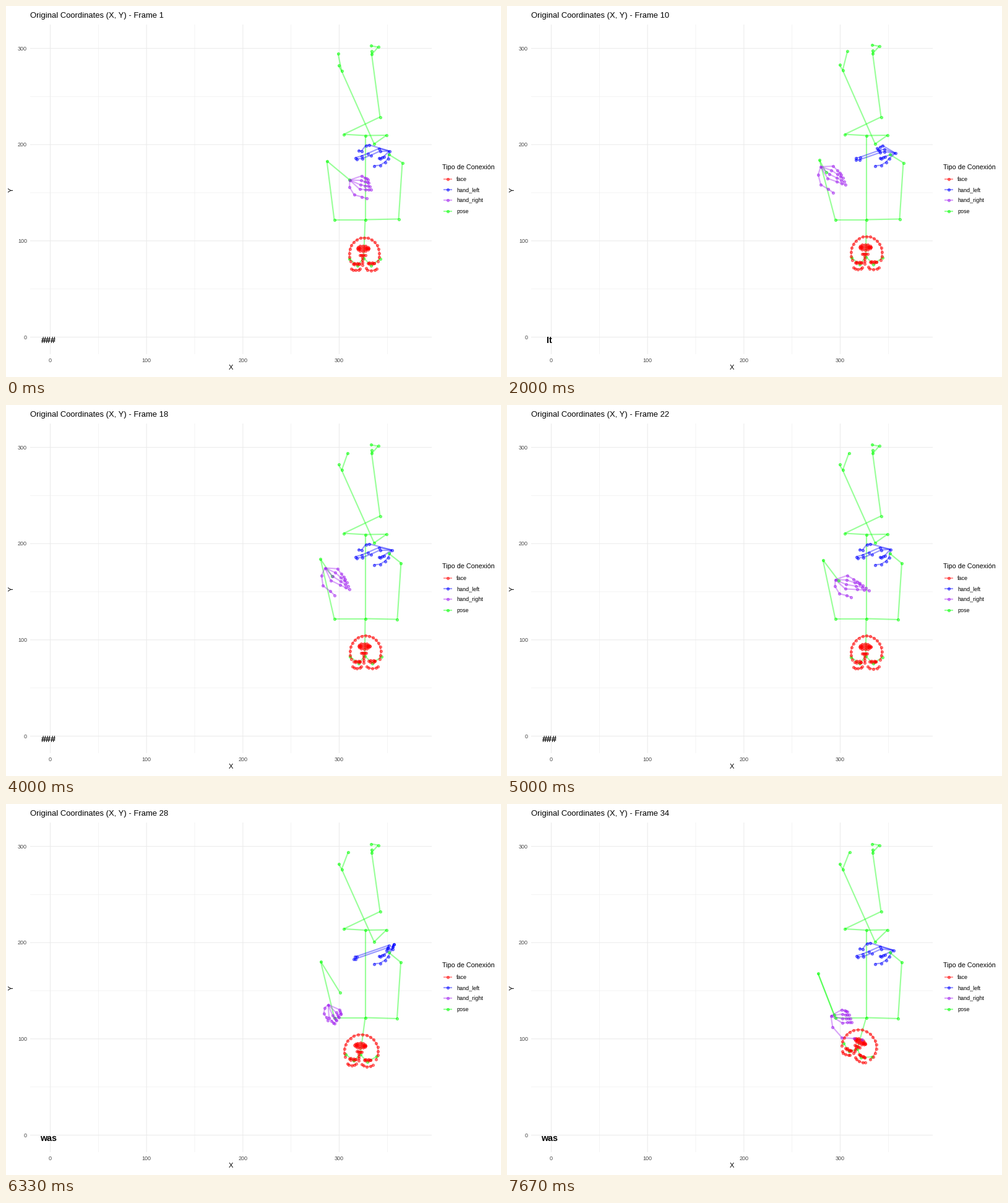
Recreate the animation shown at these times as a matplotlib script. Size 800 by 600 pixels, loop 8000 ms.

```python
import numpy as np
import matplotlib.pyplot as plt
from matplotlib.animation import FuncAnimation
from matplotlib.collections import LineCollection

LOOP, TICK, STEPS = 8000, 50, 24  # ms, ms, poses per loop
PX = 0.72                         # points per pixel at 100 dpi
COLORS = {"pose": "#00ff00", "face": "#ff0000",
          "hand_left": "#0000ff", "hand_right": "#a020f0"}

plt.rcParams["font.family"] = "Liberation Sans"


# Motion helpers
def along(path, i):
    """Linear interpolation through {step: values}."""
    steps = list(path)
    return np.array([np.interp(i, steps, column) for column in zip(*path.values())])


def ease(i, start, end):
    u = np.clip((i - start) / (end - start), 0, 1)
    return u * u * (3 - 2 * u)


def rotation(degrees):
    c, s = np.cos(np.radians(degrees)), np.sin(np.radians(degrees))
    return np.array([(c, s), (-s, c)])


def arc(cx, cy, rx, ry, start, end, n):
    a = np.radians(np.linspace(start, end, n))
    return np.c_[cx + rx * np.cos(a), cy + ry * np.sin(a)]


# Body
FEET = dict(heel_a=(537, 96), ankle_a=(542, 105), toe_b=(601, 66), toe_b2=(589, 64),
            heel_b=(590, 73), ankle_b=(590.5, 78))
HIPS = dict(hip_a=(614.5, 208.5), hip=(580, 209), hip_b=(545.5, 207), knee_b=(604, 179))
STILL = dict(knee_a=(594.5, 222.5), neck=(580, 345), shoulder_r=(530, 345), wrist_l=(618, 239.5))
LEFT_ARM = dict(shoulder_l=(634, 344), elbow_l=(640, 253))
PATHS = dict(
    toe_a={0: (536, 76), 4: (548, 68), 8: (551.5, 77), 23: (553, 77)},
    elbow_r={0: (518, 250), 4: (504, 250), 8: (505, 247), 15: (510, 250),
             19: (508, 254), 23: (502, 273)},
    wrist_r={0: (554, 280), 4: (518, 270), 8: (512, 267), 12: (526, 276),
             15: (535, 283), 19: (539, 304), 23: (528, 340)})
HEAD = dict(nose=(-1, 6), eye_r=(-11, 18), eye_l=(11, 18), ear_r=(-24.5, 7.5), ear_l=(26, 7.5))
BONES = [b.split() for b in (
    "toe_a ankle_a knee_a hip_a hip hip_b knee_b ankle_b toe_b toe_b2",
    "heel_a ankle_a", "heel_b ankle_b", "hip neck nose",
    "neck shoulder_r elbow_r wrist_r", "neck shoulder_l elbow_l wrist_l",
    "nose eye_r ear_r", "nose eye_l ear_l")]


def body_chains(i):
    shifts = [(FEET, (0, -4 * np.exp(-((i - 4) / 2) ** 2))),
              (HIPS, (0, -5.5 * ease(i, 15, 19))),
              (LEFT_ARM, np.array((-2.5, 2.5)) * ease(i, 6, 14)),
              (STILL, (0, 0))]
    joints = {name: np.add(p, move) for part, move in shifts for name, p in part.items()}
    joints |= {name: along(path, i) for name, path in PATHS.items()}
    joints |= dict(zip(HEAD, on_face(list(HEAD.values()), i)))
    return [np.array([joints[n] for n in bone]) for bone in BONES], list(joints.values())


# Face: centre x, centre y, jaw half width, vertical scale, tilt
FACE = {0: (578.5, 401, 24.5, 1, 0), 4: (580.7, 399.7, 25.2, 1, 0),
        8: (580.5, 398.5, 25, 1, 0), 15: (580.3, 399.8, 25, 1, 0),
        19: (573.5, 399, 27.5, 0.93, 4), 23: (568.5, 391.5, 28, 0.82, 26)}
FEATURES = [
    arc(-14, 22.5, 7.2, 3.5, 165, 10, 5), arc(11.5, 22.5, 9, 4, 175, 10, 5),  # brows
    np.linspace((-3, 17), (-3.3, 5), 4), np.linspace((-7, 1.3), (1.5, 1.3), 5),  # nose
    arc(-13.5, 15.2, 5, 1.3, 0, 360, 7), arc(10.5, 14.7, 5, 1.3, 0, 360, 7),  # eyes
    arc(-2.2, -9.5, 9, 4.5, 0, 360, 13), arc(-2.2, -9.5, 6.5, 1.5, 0, 360, 9)]  # lips


def on_face(points, i, squash=True):
    cx, cy, _, scale, tilt = along(FACE, i)
    return np.asarray(points) * (1, scale if squash else 1) @ rotation(tilt) + (cx, cy)


def face_chains(i):
    jaw = arc(0, 0, along(FACE, i)[2], -27, -25, 205, 17)
    chains = [on_face(jaw, i, squash=False)] + [on_face(f, i) for f in FEATURES]
    return chains, np.vstack(chains)


# Right hand: wrist x, wrist y, turn, finger reach, thumb size
RIGHT = {0: (555, 281, -8, 0.6, 0.95), 4: (510, 265, 0, 1, 1), 8: (503, 254, 17, 1, 1.2),
         12: (515, 263, 15, 1.1, 1.1), 15: (530, 282, -8, 1.25, 0.9),
         19: (520, 324, 35, 0.4, 0.6), 23: (523, 342, -18, 0.5, 1.5)}
THUMB = np.array([(-2, 12), (4, 26), (16, 31), (24, 35)])
BEND = np.array([0, 0.5, 0.8, 1])[:, None]  # joint places between knuckle and tip


def right_fingers(i):
    x, y, turn, reach, thumb = along(RIGHT, i)
    fingers = [THUMB * thumb]
    for k in range(4):
        knuckle = np.array((14 + 2 * k, 17 - 7 * k))
        fingers.append(knuckle + BEND * (30 - 5 * k, 6 + 2 * k) * reach)
    return (x, y), [f @ rotation(turn) + (x, y) for f in fingers]


# Left hand: wrist x, wrist y, how far the long fingers are pulled back
LEFT = {0: (619, 234, 0), 4: (626, 236, 0), 8: (629, 239, 1), 12: (623, 234, 0),
        15: (619, 233, 0), 19: (624, 234, 1), 23: (624, 236, 0)}
THUMB_L = np.array([(617, 246), (612, 252), (604, 257), (594, 258)])
PINKY_L = np.array([(610, 243), (607, 244), (604, 246), (602, 245)])
LONG_L = np.array([[(604, 234), (589, 241), (575, 246), (566, 247)],
                   [(602, 230), (584, 238), (574, 242), (564, 245)],
                   [(586, 224), (581, 225), (574, 234), (569, 233)]])
GRIP = np.array([(616, 232), (618, 228), (566, 246), (563, 246)])
PULLED = np.array([GRIP + (-2, 4), GRIP, GRIP[[1, 0, 0, 1]] + (8, -2)])


def left_fingers(i):
    x, y, pull = along(LEFT, i)
    return (x, y), [THUMB_L, PINKY_L, *(LONG_L + (PULLED - LONG_L) * pull)]


def hand_chains(wrist, fingers):
    return [np.vstack([wrist, f]) for f in fingers], np.vstack([wrist, *fingers])


# Stage
fig = plt.figure(figsize=(8, 6), dpi=100, facecolor="white")
ax = fig.add_axes([0, 0, 1, 1])
ax.set(xlim=(0, 800), ylim=(600, 0))
ax.axis("off")


def label(x, y, text, size, **kw):
    return ax.text(x, y, text, fontsize=size * PX, **kw)


def chart_x(v):
    return 71.5 + 1.5567 * v


def chart_y(v):
    return 535.5 - 1.5567 * v


def grid(values, width):
    lines = [((chart_x(v), 30), (chart_x(v), 563)) for v in values]
    lines += [((39, chart_y(v)), (688, chart_y(v))) for v in values if v < 320]
    ax.add_collection(LineCollection(lines, colors="#ebebeb", linewidths=width * PX,
                                     snap=False, zorder=0))


def layer(color, z):
    lines = LineCollection([], colors=color, alpha=0.4, linewidths=2.13 * PX,
                           capstyle="butt", zorder=z)
    ax.add_collection(lines)
    dots = ax.scatter([], [], s=(4.2 * PX) ** 2, c=color, edgecolors=color,
                      linewidths=PX, alpha=0.5, zorder=z + 10)
    return lines, dots


grid(range(50, 400, 100), 0.53)
grid(range(0, 400, 100), 1.07)
for v in range(0, 400, 100):
    label(chart_x(v), 576.2, v, 9, color="#4d4d4d", ha="center")
    label(34, chart_y(v) + 3.2, v, 9, color="#4d4d4d", ha="right")
label(363.7, 588, "X", 11, ha="center")
label(9, 297, "Y", 11, ha="center", va="center", rotation=90)
title = label(39, 18.8, "", 13)
word = label(68.5, 545, "", 14.2, weight="bold", ha="center")

label(705, 264, "Tipo de Conexión", 10.8)
for row, name in enumerate(sorted(COLORS)):
    y = 279.7 + 17.28 * row
    lines, dots = layer(COLORS[name], 2)
    lines.set_segments([((706.8, y), (720.6, y))])
    dots.set_offsets([(713.7, y)])
    label(728, y + 3.2, name, 9)

layers = {name: layer(color, 2 + z) for z, (name, color) in enumerate(COLORS.items())}


def show(name, chains, points):
    lines, dots = layers[name]
    pairs = [pair for c in chains for pair in zip(c[:-1], c[1:])]
    lines.set_segments(np.array(pairs) + 0.5)  # pixel centres
    dots.set_offsets(np.array(points) + 0.5)


def update(tick):
    # poses switch on a 10 ms clock, so round up to the nearest tick
    i = min(int((tick * TICK + 40) * STEPS / LOOP), STEPS - 1)
    title.set_text(f"Original Coordinates (X, Y) - Frame {int(1.478 + 1.425 * i)}")
    word.set_text("was" if i >= 18 else "It" if 1 <= i <= 8 else "###")
    show("pose", *body_chains(i))
    show("face", *face_chains(i))
    show("hand_left", *hand_chains(*left_fingers(i)))
    show("hand_right", *hand_chains(*right_fingers(i)))
    return []


anim = FuncAnimation(fig, update, frames=LOOP // TICK, interval=TICK,
                     repeat=True, repeat_delay=0, init_func=lambda: update(0))
plt.show()
```
